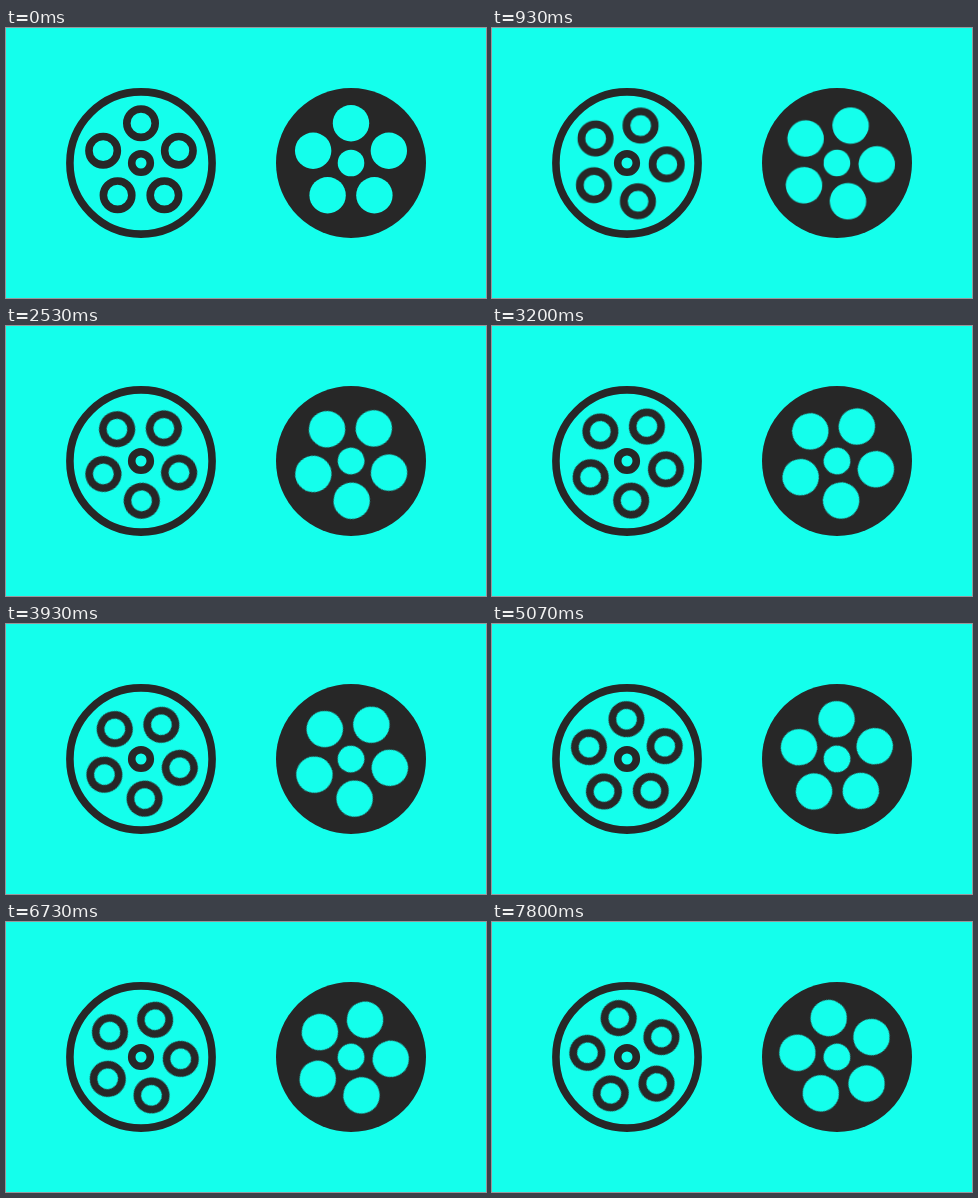
An HTML page that plays this animation: 480 px wide and 270 px high, repeating every 7.94 s.

```html
<!DOCTYPE html>
<html lang="en">
<head>
<meta charset="utf-8">
<title>Film reels</title>
<style>
  html, body { margin: 0; width: 100%; height: 100%; overflow: hidden; background: #14ffec; }
  svg { display: block; width: 480px; height: 270px; }
  .line { fill: none; stroke: #272727; stroke-width: 7.6; }
  .solid { fill: #272727; }
  .solid .holes { fill: #14ffec; }
  .holes { animation: spin 7940ms -4ms infinite; }

  /* Stepped at 15 pictures a second, with a short hitch near the end */
  @keyframes spin {
    0%      { transform: rotate(0deg);   animation-timing-function: steps(28, end); }
    23.51%  { transform: rotate(184deg); animation-timing-function: steps(20, end); }
    40.302% { transform: rotate(318deg); animation-timing-function: steps(60, end); }
    90.68%  { transform: rotate(715deg); animation-timing-function: steps(1, end); }
    92.359% { transform: rotate(733deg); animation-timing-function: steps(7, end); }
    98.237%, 100% { transform: rotate(780deg); }
  }
</style>
</head>
<body>
<svg viewBox="0 0 480 270">
  <g class="line" transform="translate(135 135)">
    <circle r="71.1"/>
    <circle r="9.3"/>
    <g class="holes" data-r="14.2"></g>
  </g>
  <g class="solid" transform="translate(345 135)">
    <circle r="75"/>
    <g class="holes" data-r="18.2"><circle r="13.3"/></g>
  </g>
</svg>
<script>
  const HOLES = 5, ORBIT = 39.8;

  for (const group of document.querySelectorAll('.holes')) {
    for (let i = 0; i < HOLES; i++) {
      const angle = i / HOLES * 2 * Math.PI;
      const hole = document.createElementNS('http://www.w3.org/2000/svg', 'circle');
      hole.setAttribute('cx', ORBIT * Math.sin(angle));
      hole.setAttribute('cy', -ORBIT * Math.cos(angle));
      hole.setAttribute('r', group.dataset.r);
      group.append(hole);
    }
  }
</script>
</body>
</html>
```
